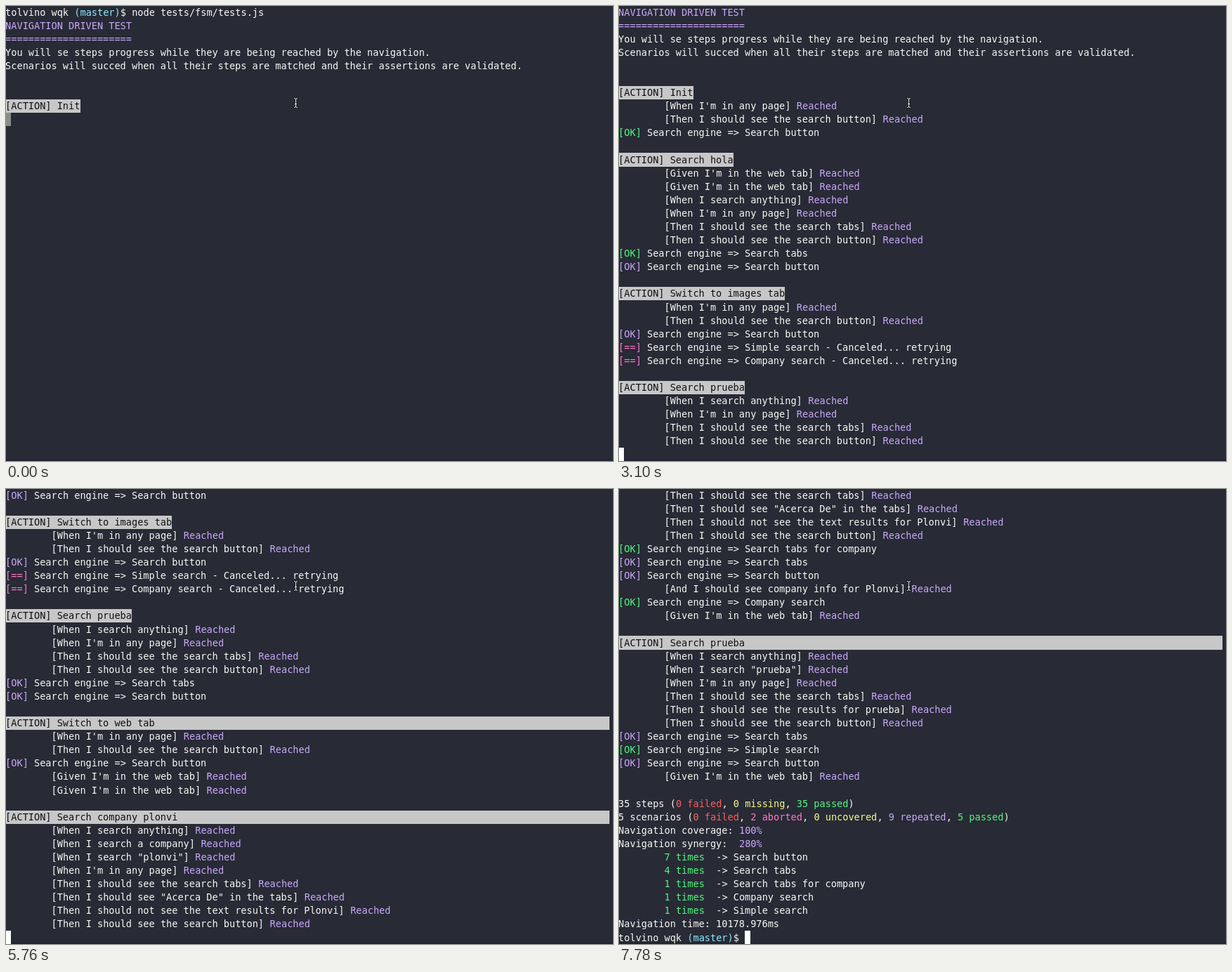
These frames come from a looping animation (864 by 648 pixels, 8000 ms). An HTML page:

```html
<!DOCTYPE html>
<html lang="en">
<head>
<meta charset="utf-8">
<title>Terminal test run</title>
<style>
  html, body { margin: 0; width: 100%; height: 100%; overflow: hidden; background: #282a36; }
  svg { display: block; width: 864px; height: 648px; }
  text { font: 13.595px "DejaVu Sans Mono", "Liberation Mono", monospace; white-space: pre; }
  rect { shape-rendering: crispEdges; }
</style>
</head>
<body>
<svg viewBox="0 0 864 648">
  <rect width="864" height="648" fill="#282a36"/>
  <rect y="646" width="864" height="2" fill="#242130"/>
  <g id="screen"></g>
  <g fill="none" stroke-linecap="round">
    <path id="beam" d="M410.5 131.3Q412.5 131.3 412.5 133.3V142.7Q412.5 144.7 410.5 144.7M414.5 131.3Q412.5 131.3 412.5 133.3M412.5 142.7Q412.5 144.7 414.5 144.7M411.3 139.5H413.7" stroke="#15161c" stroke-width="2.4"/>
    <use href="#beam"/>
    <path d="M410.5 131.3Q412.5 131.3 412.5 133.3V142.7Q412.5 144.7 410.5 144.7M414.5 131.3Q412.5 131.3 412.5 133.3M412.5 142.7Q412.5 144.7 414.5 144.7M411.3 139.5H413.7" stroke="#f4f4f4" stroke-width="1"/>
  </g>
</svg>
<script>
const NS = 'http://www.w3.org/2000/svg';
const screenEl = document.getElementById('screen');
const CELL = 8.185, LEFT = -0.9, ROW = 19.09, TOP = -0.5, BASE = 14.1;
const ROWS = 34, COLS = 105, LOOP = 8000;
const COLORS = {
  w: '#f8f8f2', p: '#caa9fa', c: '#8be9fd', g: '#50fa7b',
  k: '#ff79c6', r: '#ff5f5a', y: '#f1fa8c', b: '#101014'
};

// A tilde and a letter switch the text colour.
const step = s => `        [${s}] ~pReached`;
const action = s => `~b[ACTION] ${s}`;
const result = (mark, s) => `~${mark}~w Search engine => ${s}`;
const fresh = s => result('g[OK]', s);
const again = s => result('p[OK]', s);
const retry = s => result('k[==]', s + ' - Canceled... retrying');
const times = (n, s) => `        ~g${n} times~w  -> ${s}`;

const prompt = 'tolvino wqk ~c(master)~w$ ';
const anyPage = step("When I'm in any page");
const webTab = step("Given I'm in the web tab");
const search = step('When I search anything');
const seeTabs = step('Then I should see the search tabs');
const seeButton = step('Then I should see the search button');

const lines = [
  prompt + 'node tests/fsm/tests.js',
  '~pNAVIGATION DRIVEN TEST',
  '~p' + '='.repeat(22),
  'You will se steps progress while they are being reached by the navigation.',
  'Scenarios will succed when all their steps are matched and their assertions are validated.',
  '', '',
  action('Init'), anyPage, seeButton, again('Search button').replace('~p', '~g'), '',
  action('Search hola'), webTab, webTab, search, anyPage, seeTabs, seeButton,
  fresh('Search tabs'), again('Search button'), '',
  action('Switch to images tab'), anyPage, seeButton, again('Search button'),
  retry('Simple search'), retry('Company search'), '',
  action('Search prueba'), search, anyPage, seeTabs, seeButton,
  again('Search tabs'), again('Search button'), '',
  action('Switch to web tab'), anyPage, seeButton, again('Search button'), webTab, webTab, '',
  action('Search company plonvi'), search, step('When I search a company'),
  step('When I search "plonvi"'), anyPage, seeTabs,
  step('Then I should see "Acerca De" in the tabs'),
  step('Then I should not see the text results for Plonvi'), seeButton,
  fresh('Search tabs for company'), again('Search tabs'), again('Search button'),
  step('And I should see company info for Plonvi'), fresh('Company search'), webTab, '',
  action('Search prueba'), search, step('When I search "prueba"'), anyPage, seeTabs,
  step('Then I should see the results for prueba'), seeButton,
  again('Search tabs'), fresh('Simple search'), again('Search button'), webTab, '',
  '35 steps (~r0 failed~w, ~y0 missing~w, ~g35 passed~w)',
  '5 scenarios (~r0 failed~w, ~k2 aborted~w, ~y0 uncovered~w, ~p9 repeated~w, ~g5 passed~w)',
  'Navigation coverage: ~p100%',
  'Navigation synergy:  ~p280%',
  times(7, 'Search button'), times(4, 'Search tabs'), times(1, 'Search tabs for company'),
  times(1, 'Company search'), times(1, 'Simple search'),
  'Navigation time: 10178.976ms',
  prompt
];

// Time in ms, then the line the cursor has reached.
const output = [
  [0, 8], [500, 10], [770, 13], [1160, 19], [2650, 25], [2800, 30], [3100, 34],
  [4290, 40], [4470, 45], [5760, 53], [6070, 55], [6350, 61], [7310, 67],
  [7580, 71], [7780, 82]
];
const WIDE_FROM = 37;   // highlights reach the right edge once the screen scrolls

function add(tag, attrs, text) {
  const el = document.createElementNS(NS, tag);
  for (const key in attrs) el.setAttribute(key, attrs[key]);
  if (text) el.textContent = text;
  screenEl.appendChild(el);
}

function block(col, row, cols, fill) {
  const x = Math.max(0, LEFT + col * CELL);
  const width = LEFT + (col + cols) * CELL - x;
  add('rect', { x, y: TOP + row * ROW, width, height: ROW, fill });
}

const runs = line => ('~w' + line).split('~').slice(1).map(s => [s[0], s.slice(1)]);
const lengthOf = line => runs(line).reduce((n, run) => n + run[1].length, 0);
const isAction = line => line.startsWith('~b');

function drawLine(line, row, wide) {
  if (isAction(line)) block(0, row, wide ? COLS : lengthOf(line), '#c7c7c7');
  let col = 0;
  for (const [color, text] of runs(line)) {
    const lead = text.length - text.trimStart().length;
    if (text.trim()) {
      add('text', {
        x: LEFT + (col + lead) * CELL, y: TOP + BASE + row * ROW, fill: COLORS[color]
      }, text.trim());
    }
    col += text.length;
  }
}

function draw(at) {
  screenEl.textContent = '';
  const first = Math.max(0, at - ROWS + 1);
  const done = at === lines.length - 1;
  for (let i = first; i < at + done; i++) drawLine(lines[i], i - first, i >= WIDE_FROM);
  const waiting = isAction(lines[at - 1]);
  block(done ? lengthOf(prompt) : 0, at - first, 1, waiting ? '#8c8c8c' : '#ffffff');
}

let shown = -1;
function update(ms) {
  const t = ms % LOOP;
  const at = output.filter(entry => entry[0] <= t).pop()[1];
  if (at !== shown) draw(shown = at);
}

const start = performance.now();
function tick() {
  update(performance.now() - start);
  requestAnimationFrame(tick);
}
tick();
</script>
</body>
</html>
```
